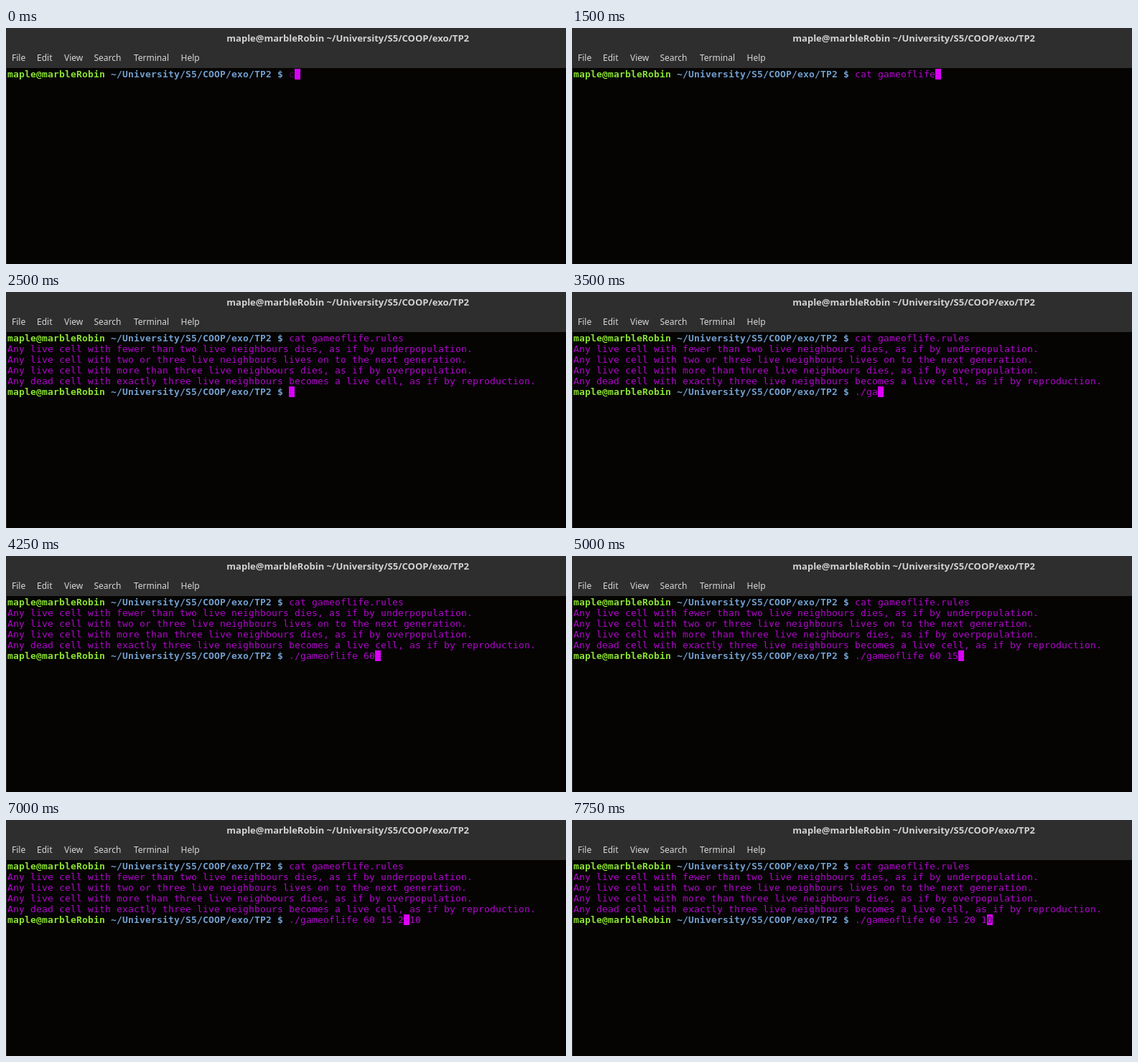
Recreate the animation shown at these times as an HTML page. Size 780x330 px, loop 8000 ms.

```html
<!DOCTYPE html>
<html lang="en">
<head>
<meta charset="utf-8">
<title>Terminal</title>
<style>
  html, body { margin: 0; width: 100%; height: 100%; overflow: hidden; background: #050402; }
  svg { display: block; }
  text { white-space: pre; }
  .title { font: bold 13px "Noto Sans", sans-serif; fill: #d2d2d2; text-anchor: end; }
  .menu { font: 12px "Noto Sans", sans-serif; fill: #d6d6d6; }
  .term { font: 13px "DejaVu Sans Mono", monospace; fill: #b405d0; }
  .term .user { font-weight: bold; fill: #8ae234; }
  .term .path { font-weight: bold; fill: #729fcf; }
  .term .under { fill: #4a0a58; }
</style>
</head>
<body>
<svg width="780" height="330" viewBox="0 0 780 330">
  <rect width="780" height="330" fill="#050402"/>
  <rect y="56" width="1" height="274" fill="#2d2d2d"/>
  <rect width="780" height="56" fill="#2e2e2e"/>
  <text id="title" class="title" x="645" y="19"></text>
  <g id="menu" class="menu"></g>
  <g id="term" class="term"></g>
</svg>
<script>
const NS = "http://www.w3.org/2000/svg";
const LOOP = 8000, TICK = 250;
const LEFT = 2, TOP = 57, CELL_W = 8, CELL_H = 15, ASCENT = 12;
const USER = "maple@marbleRobin";
const PATH = "~/University/S5/COOP/exo/TP2";
const PROMPT = USER + " " + PATH + " $ ";
const RULES = [
  "Any live cell with fewer than two live neighbours dies, as if by underpopulation.",
  "Any live cell with two or three live neighbours lives on to the next generation.",
  "Any live cell with more than three live neighbours dies, as if by overpopulation.",
  "Any dead cell with exactly three live neighbours becomes a live cell, as if by reproduction."
];

// Keys pressed on each command line; "\t" completes, "<" and ">" move the cursor.
const CAT = { keys: "cat ga\t.\t\n", start: 0, fills: ["meoflife", "rules "] };
const RUN = { keys: "./ga\t60 15 2 10<<<0>>", start: 11, fills: ["meoflife "] };

const $ = id => document.getElementById(id);

function add(parent, tag, attrs, text = "") {
  const el = document.createElementNS(NS, tag);
  for (const k in attrs) el.setAttribute(k, attrs[k]);
  el.textContent = text;
  parent.appendChild(el);
  return el;
}

function type(cmd, count) {
  const fills = [...cmd.fills];
  let text = "", pos = 0, entered = false;
  for (const key of cmd.keys.slice(0, count)) {
    if (key === "<") pos--;
    else if (key === ">") pos++;
    else if (key === "\n") entered = true;
    else {
      const piece = key === "\t" ? fills.shift() : key;
      text = text.slice(0, pos) + piece + text.slice(pos);
      pos += piece.length;
    }
  }
  return { text, pos, entered };
}

function put(row, col, text, cls = "") {
  if (!text) return;
  const x = Array.from(text, (_, i) => LEFT + (col + i) * CELL_W).join(" ");
  return add($("term"), "text", { x, y: TOP + row * CELL_H + ASCENT, class: cls }, text);
}

function putPrompt(row) {
  put(row, 0, USER, "user");
  put(row, USER.length + 1, PATH + " $", "path");
}

function putCursor(row, col, under = "") {
  add($("term"), "rect", {
    x: LEFT + col * CELL_W, y: TOP + row * CELL_H,
    width: CELL_W, height: CELL_H, fill: "#da00fa"
  });
  put(row, col, under, "under");
}

function draw(tick) {
  $("term").textContent = "";
  const cat = type(CAT, tick + 1);
  const done = tick >= 10;
  putPrompt(0);
  const typed = put(0, PROMPT.length, cat.text);
  if (tick === 0) typed.setAttribute("opacity", 0.5);

  if (!done) {
    if (cat.entered) putCursor(1, 0);
    else putCursor(0, PROMPT.length + cat.pos);
    return;
  }
  RULES.forEach((line, i) => put(i + 1, 0, line));
  putPrompt(5);
  const run = type(RUN, tick - RUN.start + 1);
  put(5, PROMPT.length, run.text);
  putCursor(5, PROMPT.length + run.pos, run.text[run.pos]);
}

$("title").textContent = USER + " " + PATH;
[["File", 8], ["Edit", 43], ["View", 81], ["Search", 122.5], ["Terminal", 178], ["Help", 243.5]]
  .forEach(([label, x]) => add($("menu"), "text", { x, y: 46 }, label));

let last = -1;
function frame() {
  const tick = Math.floor(performance.now() % LOOP / TICK);
  if (tick !== last) draw(last = tick);
  requestAnimationFrame(frame);
}
frame();
</script>
</body>
</html>
```
